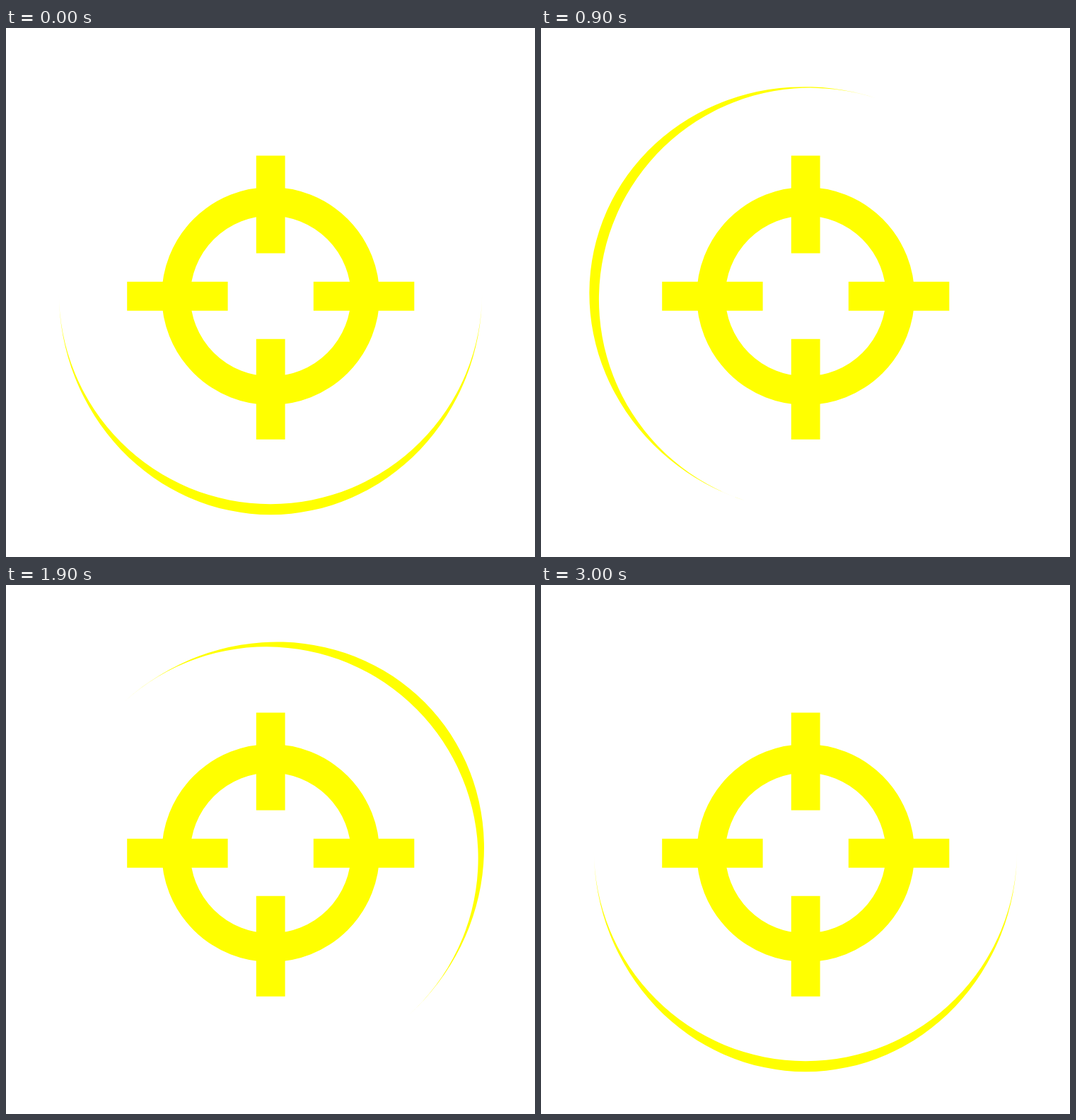
Write an HTML page that moves like this. It is 748x748 px and loops after 3100 ms.

```html
<!DOCTYPE html>
<html lang="en">
<head>
<meta charset="utf-8">
<title>Crosshair spinner</title>
<style>
  html, body { margin: 0; width: 100%; height: 100%; overflow: hidden; background: #fff; }
  svg { display: block; width: 748px; height: 748px; }
</style>
</head>
<body>
<svg viewBox="0 0 748 748" fill="#ff0">
  <circle cx="374.2" cy="379" r="133.8" fill="none" stroke="#ff0" stroke-width="40.4"/>
  <path d="M353.8 180.6h40.8v137.8h-40.8z M353.8 439.8h40.8v142h-40.8z
           M171.2 358.8h142.4v41h-142.4z M434.8 358.8h142.5v41h-142.5z"/>
  <g transform="scale(7.48)">
    <path id="crescent" d="M10 50A40 40 0 0 0 90 50A40 42 0 0 1 10 50"/>
  </g>
</svg>
<script>
  const LOOP = 3100, STEP = 100, DEGREES_PER_STEP = 12;
  const crescent = document.getElementById('crescent');

  function draw() {
    const step = Math.floor(performance.now() % LOOP / STEP);
    crescent.setAttribute('transform', `rotate(${step * DEGREES_PER_STEP} 50 51)`);
    requestAnimationFrame(draw);
  }
  draw();
</script>
</body>
</html>
```
